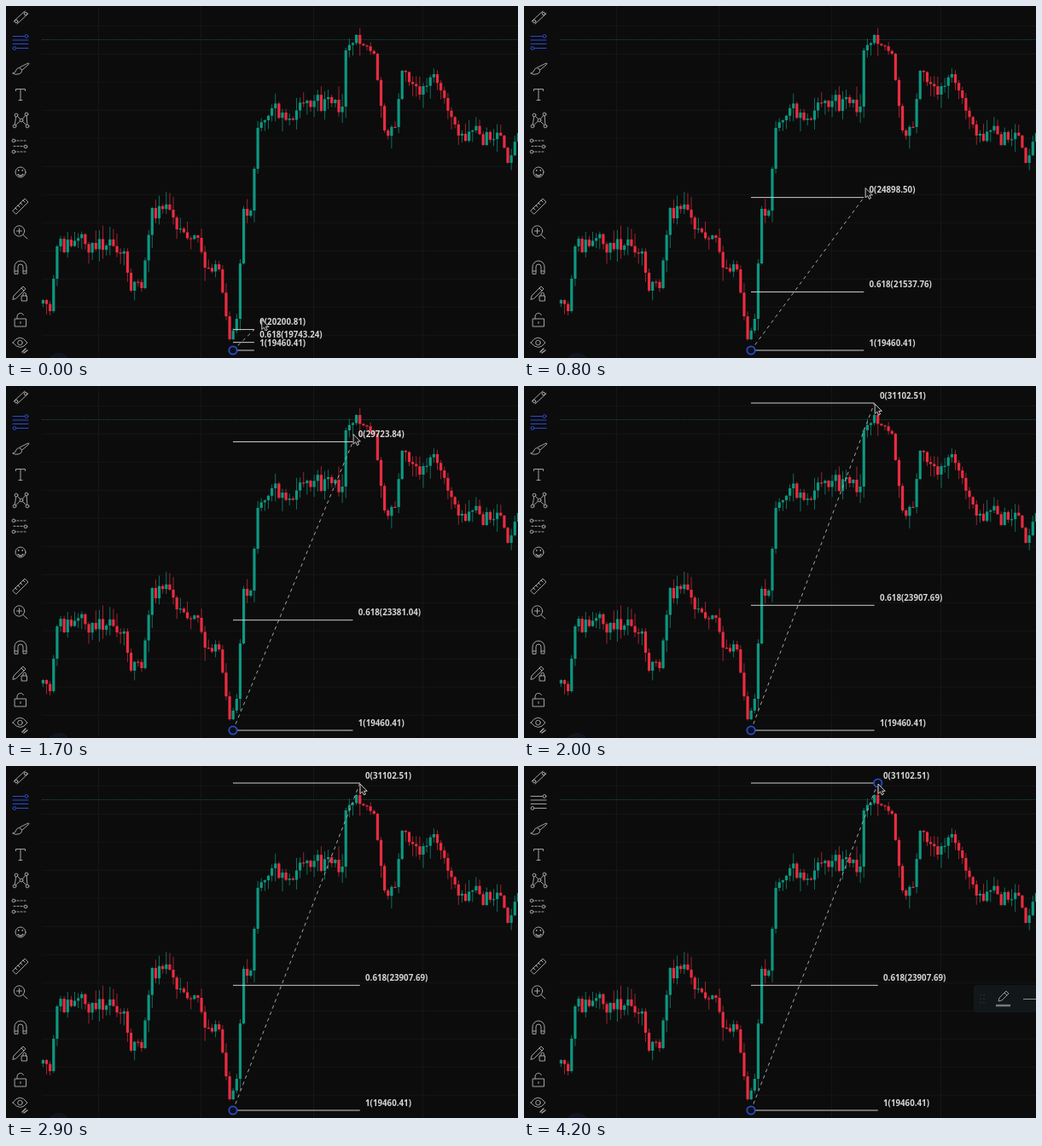
Write an HTML page that moves like this. It is 600 px wide and 413 px high and loops after 4.3 s.

```html
<!DOCTYPE html>
<html lang="en">
<head>
<meta charset="utf-8">
<title>Retracement drawing</title>
<style>
  html, body { margin: 0; width: 100%; height: 100%; overflow: hidden; background: #0c0c0c; }
  svg { display: block; width: 600px; height: 413px; }
  .grid { stroke: #161616; fill: none; }
  .up { stroke: #0d8a74; fill: #0d9780; }
  .down { stroke: #c42a3a; fill: #e92c40; }
  .wick { stroke-opacity: .8; }
  .body { stroke: none; }
  .icons { fill: none; stroke: #a2a2a2; stroke-linecap: round; stroke-linejoin: round; }
  .icons .dot { fill: #0c0c0c; }
  .icons .active { stroke: #2a4ccc; }
  .level { stroke: #cecece; }
  .trend { stroke: #a4a4a4; stroke-dasharray: 4 4; }
  .handle { fill: #0c0f1c; stroke: #2a4cc0; stroke-width: 1.8; }
  text { font: 700 9.75px "Open Sans", "Noto Sans", sans-serif; fill: #d4d4d4; }
</style>
</head>
<body>
<svg viewBox="0 0 600 413">
  <rect width="600" height="413" fill="#0c0c0c"/>
  <g id="grid"></g>
  <path d="M42 39.5H600" stroke="#17544d" stroke-dasharray="1 1"/>
  <g id="candles"></g>
  <circle cx="62" cy="421" r="14" fill="#11151f"/>

  <g class="icons">
    <path d="M9 18L22 6M13 21L26 9"/>
    <g class="dot"><circle cx="12" cy="18" r="1.8"/><circle cx="23" cy="9" r="1.8"/></g>
    <g id="tool">
      <path d="M8 35.5H26M8 40H26M8 44.5H26M8 49.5H26"/>
      <g class="dot"><circle cx="24" cy="35.5" r="1.9"/><circle cx="10" cy="49.5" r="1.9"/></g>
    </g>
    <path d="M8 79q3 0 4-4q2-4 6-1q2 5-4 6q-4 1-6-1M16 72L26 67q2 0 0 2L19 75"/>
    <path d="M11.5 99.5V97.5H22.5V99.5M17 97.5V110.500M15 110.5H19"/>
    <path d="M10 141L12 128L18 134L24 127L25 141L18 134Z"/>
    <g class="dot">
      <circle cx="10" cy="141" r="1.9"/><circle cx="12" cy="128" r="1.9"/><circle cx="18" cy="134" r="1.9"/>
      <circle cx="24" cy="127" r="1.9"/><circle cx="25" cy="141" r="1.9"/>
    </g>
    <path d="M9 158H25M9 164.500H22M9 171H25" stroke-dasharray="2 2"/>
    <g class="dot"><circle cx="9" cy="158" r="1.9"/><circle cx="9" cy="171" r="1.9"/><circle cx="23" cy="165" r="1.9"/></g>
    <circle cx="17" cy="195" r="6"/>
    <path d="M14 197.5q3 3.500 6 0M14.700 192.500v.8M19.300 192.500v.8" stroke-width="1.5"/>
    <path d="M8 240L22 226L26 230L12 244ZM11 237l2 2M14 234l2 2M17 231l2 2M20 228l2 2"/>
    <circle cx="15.5" cy="264" r="6.2"/><path d="M20 268.5L25 273M12.5 264h6M15.5 261v6"/>
    <path d="M10 314V306a7 7 0 0 1 14 0V314H20V306a3 3 0 0 0-6 0V314ZM10 311h4M20 311h4"/>
    <path d="M8 344l1-4L20 329l3 3L12 343ZM18 331l3 3"/>
    <path class="dot" d="M18.5 340h6v6h-6ZM20 340v-2a1.7 1.7 0 0 1 3.4 0v2"/>
    <path d="M10.5 367h13v9h-13ZM13 367v-3a4 4 0 0 1 7.5-1.5M17 370.5v2"/>
    <path d="M8 395q8-12 17 0q-8 11-17 0Z"/><circle cx="16.5" cy="395" r="2.8"/>
    <path d="M19 406l4-4M21 407l4-3" stroke-width="1.5"/>
  </g>

  <g id="panel">
    <rect x="527" y="257" width="80" height="32" rx="3" fill="#12171a"/>
    <path d="M535 268v12M539 268v12" stroke="#2a3236" stroke-width="1.5" stroke-dasharray="1.5 3"/>
    <path d="M556 276l1-4 8-8 3 3-8 8ZM563 266l3 3" fill="none" stroke="#929698"/>
    <path d="M553 281h17" stroke="#767a7c" stroke-width="2.5"/>
    <path d="M585 273.5h15" stroke="#8c8f90"/>
  </g>

  <path id="trend" class="trend"/>
  <g id="levels"></g>
  <circle class="handle" cx="266" cy="404" r="4.7"/>
  <circle class="handle" id="end" r="4.7"/>
  <path id="cursor" d="M0 0V11.5L2.6 9.2L4.4 13L6.4 12L4.700 8.400H8.200Z" fill="#151515" stroke="#d8d8d8" stroke-width=".9"/>
</svg>
<script>
const $ = id => document.getElementById(id);
const set = (el, attrs) => {
  for (const k in attrs) el.setAttribute(k, attrs[k]);
  return el;
};
const add = (parent, tag, attrs = {}) =>
  parent.appendChild(set(document.createElementNS('http://www.w3.org/2000/svg', tag), attrs));

const LOOP = 4300, STEP = 100, PLACED = 3900, LAG = 65;
const LOW = 19460.41, HIGH = 31102.51, BASE_X = 266, BASE_Y = 404;
const PER_PX = (HIGH - LOW) / 384;
const BARS = 136, BAR_X = 43.4, BAR_STEP = 4.126;
const barX = i => BAR_X + BAR_STEP * i;
const priceY = price => BASE_Y - (price - LOW) / PER_PX;

// Linear lookup in rows of [key, ...values]
function along(rows, key) {
  const n = Math.max(1, rows.findIndex(r => r[0] >= key));
  const a = rows[n - 1], b = rows[n], f = (key - a[0]) / (b[0] - a[0]);
  return a.slice(1).map((v, j) => v + (b[j + 1] - v) * f);
}

for (const x of [108, 228, 360, 488]) add($('grid'), 'path', { class: 'grid', d: `M${x}.5 0V413` });
for (let p = 20000; p <= 31000; p += 1000) add($('grid'), 'path', { class: 'grid', d: `M42 ${priceY(p)}H600` });

// Turning points of the market: [bar, y]
const swings = [
  [0, 345], [2, 358], [4, 282], [14, 278], [23, 288], [25, 334], [28, 331], [31, 237],
  [36, 239], [38, 262], [44, 272], [46, 307], [50, 309], [53, 391], [55, 367], [57, 238],
  [59, 240], [61, 143], [65, 120], [70, 132], [74, 114], [85, 118], [86, 52], [89, 34],
  [94, 56], [97, 146], [100, 142], [102, 76], [107, 104], [111, 80], [118, 152],
  [130, 152], [132, 184], [135, 149]
];
let seed = 11;
const rand = () => (seed = seed * 16807 % 2147483647) / 2147483647;
const wick = () => 1 + 15 * rand() ** 2;

let open = 349;
for (let i = 0; i < BARS; i++) {
  const [y] = along(swings, i);
  const slope = Math.abs(y - along(swings, Math.max(0, i - 1))[0]);
  const turning = swings.some(s => s[0] === i);
  // Calm stretches wobble, steep ones run straight
  const close = y + (turning ? 0 : (rand() - 0.5) * 26 / (1 + slope / 4));
  const x = barX(i), top = Math.min(open, close), bottom = Math.max(open, close);
  const side = close <= open ? 'up' : 'down';
  add($('candles'), 'path', { class: `wick ${side}`, d: `M${x} ${top - wick()}V${bottom + wick()}` });
  add($('candles'), 'rect', { class: `body ${side}`, x: x - 1.6, y: top, width: 3.2, height: Math.max(1.2, bottom - top) });
  open = close;
}

const levels = [0, 0.618, 1].map(ratio => ({
  ratio,
  line: add($('levels'), 'path', { class: 'level' }),
  label: add($('levels'), 'text')
}));

// Drag path: [time, x, price]
const drag = [
  [0, 291, 20200.81], [800, 398.5, 24898.5], [1300, 411, 27732.43], [1700, 406, 29723.84],
  [2000, 411, HIGH], [2400, 412, HIGH], [2800, 415, HIGH], [LOOP, 415, HIGH]
];

function draw(t) {
  const [dragX, price] = along(drag, t);
  const [cursorX, cursorPrice] = along(drag, Math.min(LOOP, t + LAG));
  const x = barX(Math.round((dragX - BAR_X) / BAR_STEP)), y = priceY(price);
  const placed = t >= PLACED, visibility = placed ? 'visible' : 'hidden';
  for (const { ratio, line, label } of levels) {
    const value = price + (LOW - price) * ratio, ly = priceY(value);
    set(line, { d: `M${BASE_X} ${ly}H${x}` });
    set(label, { x: x + 6.3, y: ly - 5.5 }).textContent = `${ratio}(${value.toFixed(2)})`;
  }
  set($('trend'), { d: `M${BASE_X} ${BASE_Y}L${x} ${y}` });
  set($('end'), { cx: x, cy: y, visibility });
  set($('panel'), { visibility });
  set($('tool'), { class: placed ? '' : 'active' });
  set($('cursor'), { transform: `translate(${cursorX} ${priceY(cursorPrice) + 1})` });
}

const start = performance.now();
function tick(now) {
  const t = Math.max(0, now - start) % LOOP;
  draw(Math.floor(t / STEP) * STEP);
  requestAnimationFrame(tick);
}
draw(0);
requestAnimationFrame(tick);
</script>
</body>
</html>
```
